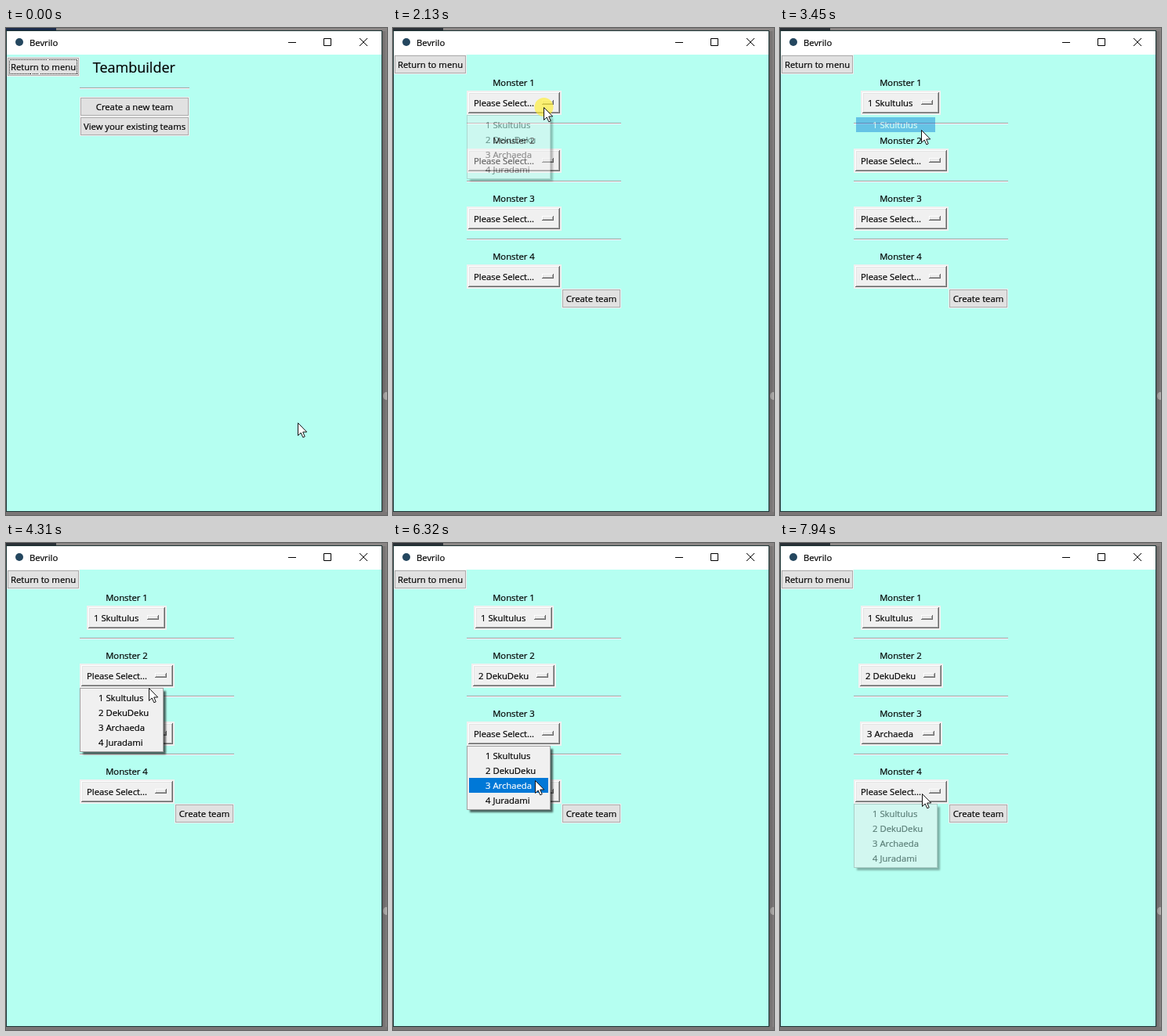
Recreate the animation shown at these times as an HTML page. Size 486 by 622 pixels, loop 8 s.

```html
<!DOCTYPE html>
<html lang="en">
<head>
<meta charset="utf-8">
<title>Team builder</title>
<style>
html, body { margin: 0; width: 100%; height: 100%; overflow: hidden; }
svg { display: block; width: 486px; height: 622px; cursor: default; }
text {
  font: 11.3px "Open Sans", "Noto Sans", sans-serif; white-space: pre;
  color: #000; fill: currentColor; stroke: currentColor; stroke-width: .2;
}
.mid { text-anchor: middle; }
.title { font-size: 18px; }
.crisp { shape-rendering: crispEdges; }
</style>
</head>
<body>
<svg viewBox="0 0 486 622">
  <defs>
    <linearGradient id="side" x2="0" y2="1">
      <stop offset="0" stop-color="#8a8685"/>
      <stop offset=".35" stop-color="#827e7f"/>
      <stop offset=".7" stop-color="#7d797a"/>
      <stop offset="1" stop-color="#8b8787"/>
    </linearGradient>
    <linearGradient id="shade">
      <stop offset="0" stop-color="#000" stop-opacity=".22"/>
      <stop offset="1" stop-color="#000" stop-opacity="0"/>
    </linearGradient>
    <filter id="soft"><feGaussianBlur stdDeviation="1.2"/></filter>
  </defs>

  <rect width="486" height="622" fill="url(#side)"/>
  <rect id="corner" width="64" height="4"/>
  <ellipse cx="485" cy="470" rx="4" ry="5" fill="#b4b1b0"/>
  <rect x="480" y="4" width="6" height="614" fill="url(#shade)"/>
  <rect y="618" width="486" height="4" fill="#7b7777"/>

  <g class="crisp">
    <rect y="3" width="480" height="615" fill="#1c3434"/>
    <rect x="1" y="4" width="478" height="30" fill="#fff"/>
    <rect x="1" y="34" width="478" height="583" fill="#b5fff1"/>
  </g>
  <circle cx="17" cy="18" r="5" fill="#24475f"/>
  <text x="30" y="22.6">Bevrilo</text>
  <g fill="none" stroke="#000">
    <path d="M360 18.5h10M405.5 13.5h9v9h-9z"/>
    <path d="M451 13l10 10M461 13l-10 10"/>
  </g>

  <g id="back"></g>
  <g id="home"></g>
  <g id="editor"></g>
  <g id="menu"></g>
  <circle id="press" r="12" fill="#ffee32" opacity=".66"/>
  <path id="pointer" d="M-.5 .5V16.5L3.2 13L5.8 18.8L8.2 17.8L5.7 12H10.7Z" fill="#fff" stroke="#111"/>
</svg>

<script>
const LOOP = 8000, PITCH = 74, PAGE_CHANGE = 1520;
const NAMES = ["1 Skultulus", "2 DekuDeku", "3 Archaeda", "4 Juradami"];
const WIDTHS = [102, 108, 105], EMPTY_WIDTH = 121;
const FADE_IN = 200, FADE_OUT = 350;

// One entry per drop-down: when it opens and when its item is picked.
const PICKS = [
  { open: 2050, pick: 3255 },
  { open: 4010, pick: 4900 },
  { open: 5490, pick: 7187 },
  { open: 7840, pick: Infinity }
];
const CLICKS = [[1380, 1520], [2030, 2170], [3170, 3255], [4000, 4110],
  [4810, 4900], [5480, 5590], [7100, 7187], [7800, 7900]];

// time, x, y of the pointer tip
const PATH = [
  [0, 373, 504], [250, 373, 504], [720, 265, 174], [830, 264, 172],
  [1200, 196, 101], [1540, 196, 101], [1900, 193, 101], [2250, 193, 101],
  [2800, 181, 130], [3450, 181, 130], [3850, 184, 162], [4150, 184, 162],
  [4520, 182, 218], [4980, 182, 218], [5320, 181, 237], [5640, 181, 237],
  [6300, 182, 303], [6800, 183, 306], [7270, 183, 306], [7560, 182, 320],
  [LOOP, 182, 320]
];

const $ = id => document.getElementById(id);
const clamp = v => Math.max(0, Math.min(1, v));
const rect = (x, y, w, h, fill, more = "") =>
  `<rect class="crisp" x="${x}" y="${y}" width="${w}" height="${h}" fill="${fill}" ${more}/>`;
const framed = (x, y, w, h, edge, fill) =>
  rect(x, y, w, h, edge) + rect(x + 1, y + 1, w - 2, h - 2, fill);
const label = (x, y, s, cls = "", color = "#000") =>
  `<text x="${x}" y="${y}" class="${cls}" style="color:${color}">${s}</text>`;
const paint = (id, html) => {
  const el = $(id);
  if (el.source !== html) el.innerHTML = el.source = html;
};

function button(x, y, w, s, state = "", focus = false) {
  const [fill, edge] = {
    hover: ["#e5f1fb", "#0078d7"],
    down: ["#cce4f7", "#005499"]
  }[state] || ["#e1e1e1", "#adadad"];
  const dots = focus ? rect(x + 2.5, y + 2.5, w - 5, 18, "none",
    'stroke="#222" stroke-dasharray="1 1"') : "";
  return rect(x - 1, y - 1, w + 2, 25, "#f0f0f0") +
    framed(x, y, w, 23, edge, fill) +
    dots + label(x + w / 2, y + 15.7, s, "mid");
}

// Raised two-pixel edge: light on the top left, dark on the bottom right.
function bevel(x, y, w, h) {
  return rect(x, y, w, h, "#696969") +
    rect(x, y, w - 1, h - 1, "#fff") +
    rect(x + 1, y + 1, w - 2, h - 2, "#a0a0a0") +
    rect(x + 1, y + 1, w - 3, h - 3, "#e3e3e3") +
    rect(x + 2, y + 2, w - 4, h - 4, "#f0f0f0");
}

function rule(y, w) {
  return rect(94, y, w, 1, "#a0a0a0") + rect(94, y + 1, w, 1, "#fff");
}

function row(i, chosen) {
  const w = chosen ? WIDTHS[i] : EMPTY_WIDTH;
  const x = 94 + Math.floor((EMPTY_WIDTH - w) / 2), y = 80 + i * PITCH;
  return label(154, y - 6, "Monster " + (i + 1), "mid") +
    rect(x, y, w, 31, "#f0f0f0") +
    bevel(x + 2, y + 2, w - 4, 27) +
    label(x + 9, y + 20, chosen ? NAMES[i] : "Please Select...") +
    bevel(x + w - 25, y + 12, 15, 6) +
    (i < 3 ? rule(y + 41, 197) : "");
}

function item(i, top, active) {
  const y = top + 3 + i * 19;
  return (active ? rect(97, y, 101, 19, "#0078d7") : "") +
    label(118, y + 14, NAMES[i], "", active ? "#fff" : "#000");
}

function menu(top, hover) {
  return `<rect x="98" y="${top + 4}" width="106" height="81" fill="#000" opacity=".6" filter="url(#soft)"/>` +
    framed(94, top, 107, 82, "#a0a0a0", "#f0f0f0") +
    NAMES.map((_, i) => item(i, top, i === hover)).join("");
}

function pointerAt(t) {
  const k = Math.max(1, PATH.findIndex(p => p[0] > t));
  const [t0, x0, y0] = PATH[k - 1], [t1, x1, y1] = PATH[k];
  const u = clamp((t - t0) / (t1 - t0)), e = u * u * (3 - 2 * u);
  return [x0 + (x1 - x0) * e, y0 + (y1 - y0) * e];
}

function drawMenu(t, y) {
  let html = "", alpha = 1;
  PICKS.forEach(({ open, pick }, i) => {
    const top = 111 + i * PITCH;
    if (t >= open && t < pick) {
      html = menu(top, Math.floor((y - top - 3) / 19));
      alpha = clamp((t - open) / FADE_IN);
    } else if (t >= pick && t < pick + FADE_OUT) {
      html = item(i, top, true);
      alpha = 1 - (t - pick) / FADE_OUT;
    }
  });
  paint("menu", html);
  $("menu").setAttribute("opacity", alpha);
}

function draw(t) {
  const [x, y] = pointerAt(t);
  const pressed = CLICKS.some(([a, b]) => t >= a && t < b);
  const home = t < PAGE_CHANGE, clicked = t >= CLICKS[0][0];
  const over = x > 95 && x < 233 && y > 89 && y < 112;

  $("corner").setAttribute("fill", t < 1000 ? "#1b2b4a" : "#2a3036");
  paint("back", button(2, home ? 38 : 35, 91, "Return to menu", "", !clicked));
  paint("home", !home ? "" :
    label(163.3, 57, "Teambuilder", "mid title") + rule(76, 140) +
    button(95, 89, 138, "Create a new team", clicked ? "down" : over ? "hover" : "", clicked) +
    button(95, 114, 138, "View your existing teams"));
  paint("editor", home ? "" :
    PICKS.map((p, i) => row(i, t >= p.pick)).join("") +
    button(216, 334, 74, "Create team"));
  drawMenu(t, y);

  const spot = $("press");
  spot.setAttribute("visibility", pressed ? "visible" : "hidden");
  spot.setAttribute("cx", x - .5);
  spot.setAttribute("cy", y);
  $("pointer").setAttribute("transform", `translate(${Math.round(x)} ${Math.round(y)})`);
}

const start = performance.now();
function tick() {
  draw((performance.now() - start) % LOOP);
  requestAnimationFrame(tick);
}
tick();
</script>
</body>
</html>
```
